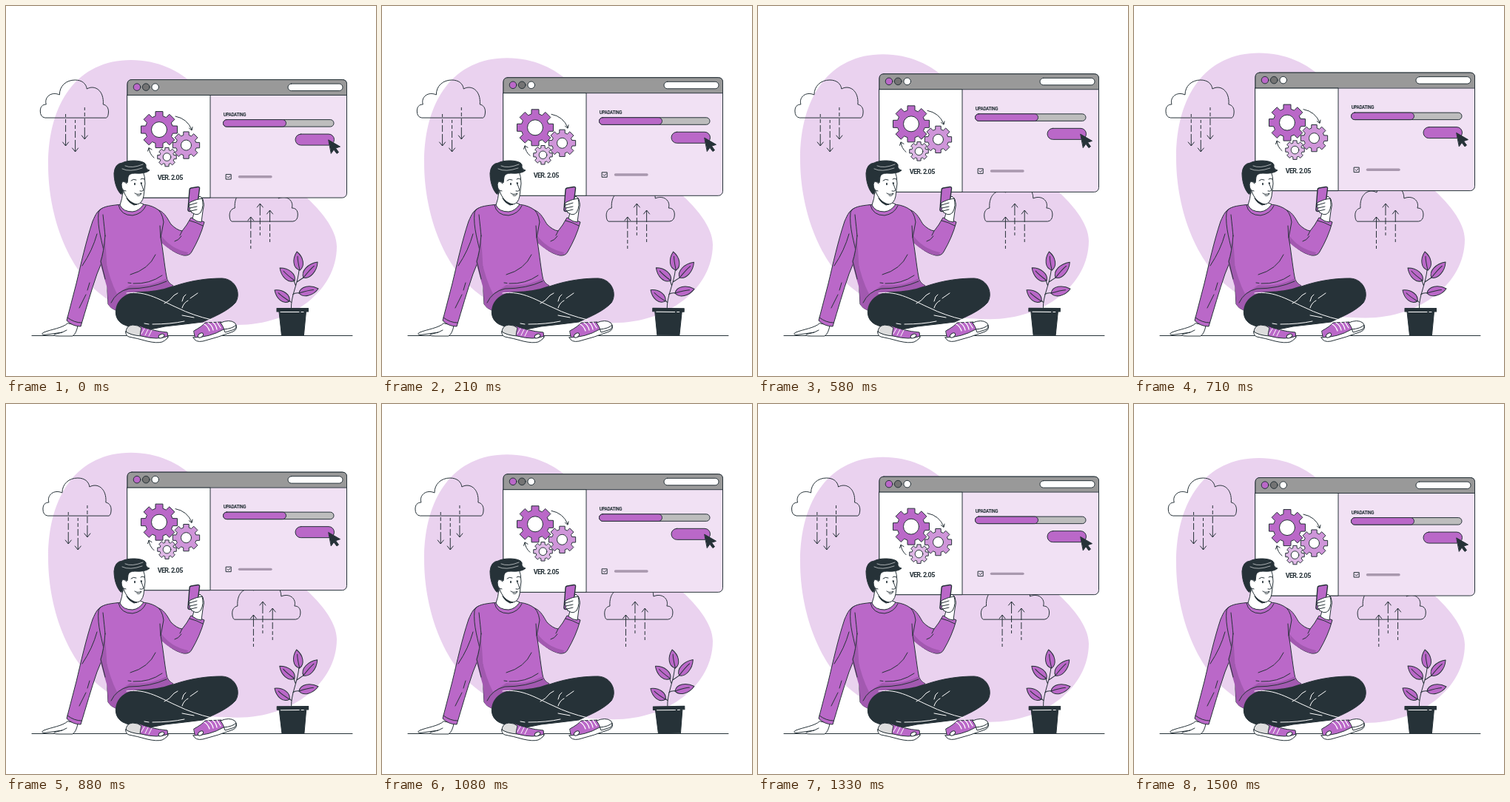
An HTML page that plays this animation: 500 px wide and 500 px high, repeating every 1.54 s.

```html
<!DOCTYPE html>
<html lang="en">
<head>
<meta charset="utf-8">
<title>Update in progress</title>
<style>
  html, body { margin: 0; width: 100%; height: 100%; overflow: hidden; background: #fff; }
  svg { display: block; width: 100%; height: 100%; }
  .art { fill: none; stroke: #263238; stroke-width: 1; stroke-linecap: round; stroke-linejoin: round; }
  .purple { fill: #ba68c8; }
  .shade { fill: #a259b0; stroke: none; }
  .white { fill: #fff; }
  .dark { fill: #263238; }
  .plain { stroke: none; }
  .light { stroke: #fff; }
  text { font-family: Roboto, "Liberation Sans", sans-serif; font-weight: 700; letter-spacing: -.07em; fill: #263238; stroke: none; text-anchor: middle; }
</style>
</head>
<body>
<svg viewBox="0 0 500 500">
  <defs>
    <path id="cloud" d="M52.500 151Q46.500 150 46.500 142C46.500 136 49.500 133 54.500 133C51.500 123 61.500 115 72.500 120C72.500 108 81.500 100 93.500 100C103 100 108.500 105 109.500 112C120 106 133 114 131.500 133C136.500 134 138.700 138 138.700 143Q138.500 150 136 151Z"/>
  </defs>
  <g class="art">
    <g class="float">
      <path class="plain" fill="#ead2ef" d="M169 73C205 73 234 87 256 108C300 150 345 215 395 249C425 274 447 302 447 325C447 384 387 431 313 431C255 430 185 422 140 398C85 364 57 285 57 215C57 130 97 73 169 73Z"/>
    </g>
    <g class="shake">
      <use href="#cloud" transform="matrix(-1 0 0 1 441 140)"/>
      <g id="uploads"></g>
    </g>
    <g class="shake">
      <use href="#cloud"/>
      <g id="downloads"></g>
    </g>

    <g class="float">
      <rect x="164" y="99.500" width="296.500" height="159.500" rx="6" fill="#f1e1f4"/>
      <path class="white" d="M164 120H276V259H170Q164 259 164 253Z"/>
      <path fill="#999" d="M164 120V105.500Q164 99.500 170 99.500H454.500Q460.500 99.500 460.500 105.500V120Z"/>
      <circle class="purple" cx="177" cy="109.500" r="4.800"/>
      <circle fill="#737373" cx="189.200" cy="109.500" r="4.800"/>
      <circle class="white" cx="201.700" cy="109.500" r="4.800"/>
      <rect class="white" x="381" y="105" width="74" height="9.500" rx="4.700"/>
      <g id="gears"></g>
      <path d="M229 149Q245 152 251 167M247.500 165L251 168L252 163.500M200 205Q194 200 193 192M191.500 196L193 191.500L197 194"/>
      <text x="221.700" y="235" font-size="9">VER. 2.05</text>
      <text x="309" y="148.500" font-size="6.300">UPADATING</text>
      <rect fill="#bdbdbd" x="293.500" y="153.500" width="149.500" height="9.500" rx="4.700"/>
      <rect class="purple" x="293.500" y="153.500" width="85" height="9.500" rx="4.700"/>
      <rect class="purple" x="391" y="173" width="52.500" height="15" rx="7.500"/>
      <path class="dark" d="M436 181L451.500 190L445.500 192L449.500 197.500L447 199.300L443 194L439.500 199Z"/>
      <path d="M297.500 227.500H304.200V234H297.500ZM299 230.500L300.500 232L303 229.500"/>
      <path stroke="#a998ae" stroke-width="3.400" d="M315.500 230.700H358"/>
    </g>

    <path d="M35 445.500H468"/>
    <g id="plant">
      <path d="M385.500 408C385 390 394 378 396 357M386 401L383 398M387.500 390Q391 387 397 388M391.500 378L389 371M393 373Q396 371 402 367"/>
      <path class="dark" d="M366 408.500H408.500V413H366ZM369 413H405.500L402.500 445H372.500Z"/>
      <path class="light" d="M371 413.500H396M399 413.500H402"/>
    </g>

    <g id="person">
      <!-- resting hand and arm -->
      <path class="white" d="M83 429C77 435 61 437 51 441Q46 444 52 444.500L76 441L66 443.500Q62 446 72 446H90Q95 443 97 432Z"/>
      <path d="M76 441L82 438"/>
      <path class="purple" d="M134 272C124 274 121 282 117 291C108 318 101 350 95 375L82 425Q90 433 101 433C108 410 115 385 123 362L140 320Z"/>
      <path d="M83 421Q92 428 102 428M123 308Q117 330 103 351M108 390L99 408M113 374L110 384"/>

      <!-- raised arm -->
      <path class="purple" d="M196 273C214 275 217 286 223 295Q231 303 238 304Q244 297 250 286Q260 288 268 292C264 307 258 320 251 332Q248 338 240 337C226 334 214 323 205 312Z"/>
      <path class="shade" d="M209 309Q222 328 246 333Q246 338 236 336Q222 331 209 319Z"/>
      <path d="M238 304L235 310M248 290Q257 292 266 297M228 318Q233 317 237 311"/>

      <!-- legs -->
      <path class="dark" d="M149 408C150 390 172 382 226 379C252 370 275 368 292 368C311 369 318 389 310 401C300 412 283 419 266 427Q242 430 215 433L195 437Q172 437 158 430C149 425 147 416 149 408Z"/>

      <!-- sweater -->
      <path class="purple" d="M152 268.500C139 270 128 271 125 279C123 300 130 318 134 340Q138 365 137 385L138 403Q142 409 148 411C150 397 160 388 179 386Q205 386 226 378Q218 374 217 366C214 350 212 328 209 313L213 292Q211 277 202 273Q193 268 181 268Z"/>
      <path class="shade" d="M133 337Q137 365 137 384L138 403Q142 409 148 411C150 397 160 388 179 386Q205 386 226 378Q219 375 217 368Q195 380 168 377L150 389Q140 370 133 337ZM134 316L127 346L133 368L137 382Q137 350 134 316Z"/>
      <path d="M134 310Q132 334 128 345L134 369M209 313L208 297M142 401Q149 386 166 382Q195 382 217 372M165 374L169 374.500M172 375Q194 376 211 364M168 363Q193 356 202 336M131 282Q133 300 134 311"/>
      <path class="white" d="M158 250Q157 262 154 269Q158 278 171 278Q180 277 186 268L177 264Z"/>
      <path d="M152 269Q155 283 171 283Q184 281 189 270"/>

      <!-- head -->
      <path class="white" d="M157 225Q155 242 160 253C164 262 171 268 177 268Q184 267 186 257L188 240Q188 230 185 223Z"/>
      <path class="dark" d="M163 260Q170 267 177 268L173 269Q166 266 163 260Z"/>
      <path class="dark" d="M155 254C149 248 146 236 146 226Q147 213 157 212C164 208 181 208 187 212Q190 214 189 218Q191 222 194 222Q189 227 174 226Q166 226 165 231L164 239L160 237Q156 238 157 246L158 253Z"/>
      <path class="white" d="M163 240Q157 234 156 241Q156 250 162 250"/>
      <path d="M169 236Q172 233 176 235M182 234Q184 232 187 234M182 239Q185 245 186 249Q184 251 181 250M174 253Q178 256 183 253Q181 258 177 256"/>
      <path class="light" stroke-width=".6" d="M157 220Q167 225 184 219M161 216Q170 220 185 214"/>
      <ellipse class="dark plain" cx="174" cy="240.500" rx="1" ry="1.700"/>
      <ellipse class="dark plain" cx="183" cy="239.500" rx=".9" ry="1.600"/>

      <!-- phone and hand -->
      <path class="white" d="M254 280L252 287Q258 292 264 292L266 277Q269 268 266 261L262 257L255 263Z"/>
      <path class="purple" stroke-width="1.400" d="M250 246L259 244.500Q262 244 261.500 247L258 274Q257.500 276.500 255 276.500L248 277.500Q245.500 277 246 274.500L248 248.500Q248 246.500 250 246Z"/>
      <path class="white" d="M265 260Q257 261 249 265Q246 267 248 269Q246 271 248.500 273Q247 276 250 277Q250 280 253 280Q258 284 263 279Q268 270 265 260Z"/>
      <path d="M248 269L258 266M248.500 273L258 271M250 277L258 275"/>

      <!-- trouser folds -->
      <path class="light" d="M163 388C190 384 211 399 232 408Q252 418 278 424M187 429L193 430M198 430Q222 430 241 426M214 402Q221 399 227 391L232 388M238 408Q240 401 246 398M238 399L240 393L243 390M249 395L259 388M238 418L254 421"/>

      <!-- shoes -->
      <path class="purple" d="M180 432Q196 439 218 441L219 448Q210 453 201 452L179 445Z"/>
      <path fill="#ddd" d="M162 441Q162 432 171 431Q179 431 183 435Q181 442 181 447Q170 445 162 441Z"/>
      <path class="white" d="M162 440Q168 445 183 446Q205 452 219 446Q219 450 211 454Q204 456 191 453Q177 449 166 447Q161 445 162 440Z"/>
      <ellipse class="white" cx="210" cy="446" rx="4" ry="2.500" transform="rotate(-25 210 446)"/>
      <path class="light" d="M187 436L183 443M192 437L188 445M197 438L193 446"/>
      <path class="purple" d="M254 439Q265 433 269 428L291 427L298 437Q278 447 256 450Z"/>
      <path class="white" d="M290 428Q302 423 309 428Q313 432 309 437L296 441Q294 433 290 428ZM253 448Q275 448 294 437Q306 436 311 431Q313 437 307 440Q286 448 266 453Q256 455 253 448Z"/>
      <ellipse class="white" cx="263" cy="445" rx="4" ry="2.500" transform="rotate(-35 263 445)"/>
      <path class="light" stroke-width="1.300" d="M268 430Q273 433 275 439M273 428Q279 432 280 438M279 427Q284 431 285 437M285 427L290 435"/>
    </g>
  </g>
</svg>
<script>
const find = id => document.getElementById(id);
const add = (id, markup) => find(id).insertAdjacentHTML('beforeend', markup);

function gear(x, y, outer, hole, color) {
  const root = outer * 0.76, points = [];
  for (let tooth = 0; tooth < 8; tooth++) {
    for (const [radius, offset] of [[root, -0.27], [outer, -0.2], [outer, 0.2], [root, 0.27]]) {
      const angle = tooth * Math.PI / 4 + offset;
      points.push(`${x + radius * Math.cos(angle)} ${y + radius * Math.sin(angle)}`);
    }
  }
  add('gears', `<path fill="${color}" d="M${points.join('L')}Z"/>
    <circle class="white" cx="${x}" cy="${y}" r="${hole}"/>`);
}

function leaf(x, y, tipX, tipY) {
  const dx = tipX - x, dy = tipY - y, length = Math.hypot(dx, dy);
  const angle = Math.atan2(dy, dx) * 180 / Math.PI;
  add('plant', `<g transform="translate(${x} ${y}) rotate(${angle})">
    <path class="purple" d="M0 0C4 -9 ${length * 0.65} -8 ${length} 0C${length * 0.65} 8 4 8 0 0Z"/>
    <path d="M0 0Q${length / 2} -1 ${length * 0.75} 0"/></g>`);
}

// The head sits at y; dir points from the tail towards the head.
function arrow(id, x, y, dir) {
  add(id, `<path d="M${x - 4} ${y - 5 * dir}L${x} ${y}L${x + 4} ${y - 5 * dir}"/>
    <path stroke-linecap="butt" stroke-dasharray="16 3 9 3 5 3 4" d="M${x} ${y}v${-43 * dir}"/>`);
}

gear(207, 167, 25, 10.5, '#ba68c8');
gear(243.5, 188, 18.5, 7, '#cf95d9');
gear(217.5, 204, 13, 5.3, '#dfb8e6');

[[397, 357, 393, 332], [402, 367, 421, 346], [390, 371, 370, 354], [396, 388, 422, 382], [383, 399, 363, 384]]
  .forEach(ends => leaf(...ends));

[[80.8, 189], [93.8, 197], [106.5, 180]].forEach(([x, y]) => arrow('downloads', x, y, 1));
[[331, 285], [343.5, 267], [356.8, 276]].forEach(([x, y]) => arrow('uploads', x, y, -1));

const LOOP = 1540, CYCLE = 1500, LEAD = 30;
const FLOAT = [0.5, -9.5, 0.5];
const SHAKE = [0, -1, 2, -4, 4, -4, 4, -4, 2, -1, 0];
const WIND = [0, 1, 0, -1, 0];

// Linear interpolation through evenly spaced keys.
function track(keys, phase) {
  const position = phase * (keys.length - 1), i = Math.floor(position);
  return keys[i] + (keys[i + 1] - keys[i]) * (position - i);
}

function move(selector, transform) {
  document.querySelectorAll(selector).forEach(el => el.setAttribute('transform', transform));
}

function draw() {
  const phase = (performance.now() % LOOP + LEAD) % CYCLE / CYCLE;
  move('.float', `translate(0 ${track(FLOAT, phase)})`);
  move('.shake', `translate(${track(SHAKE, phase)} 0)`);
  move('#plant', `rotate(${track(WIND, phase)} 392 388)`);
  requestAnimationFrame(draw);
}
draw();
</script>
</body>
</html>
```
